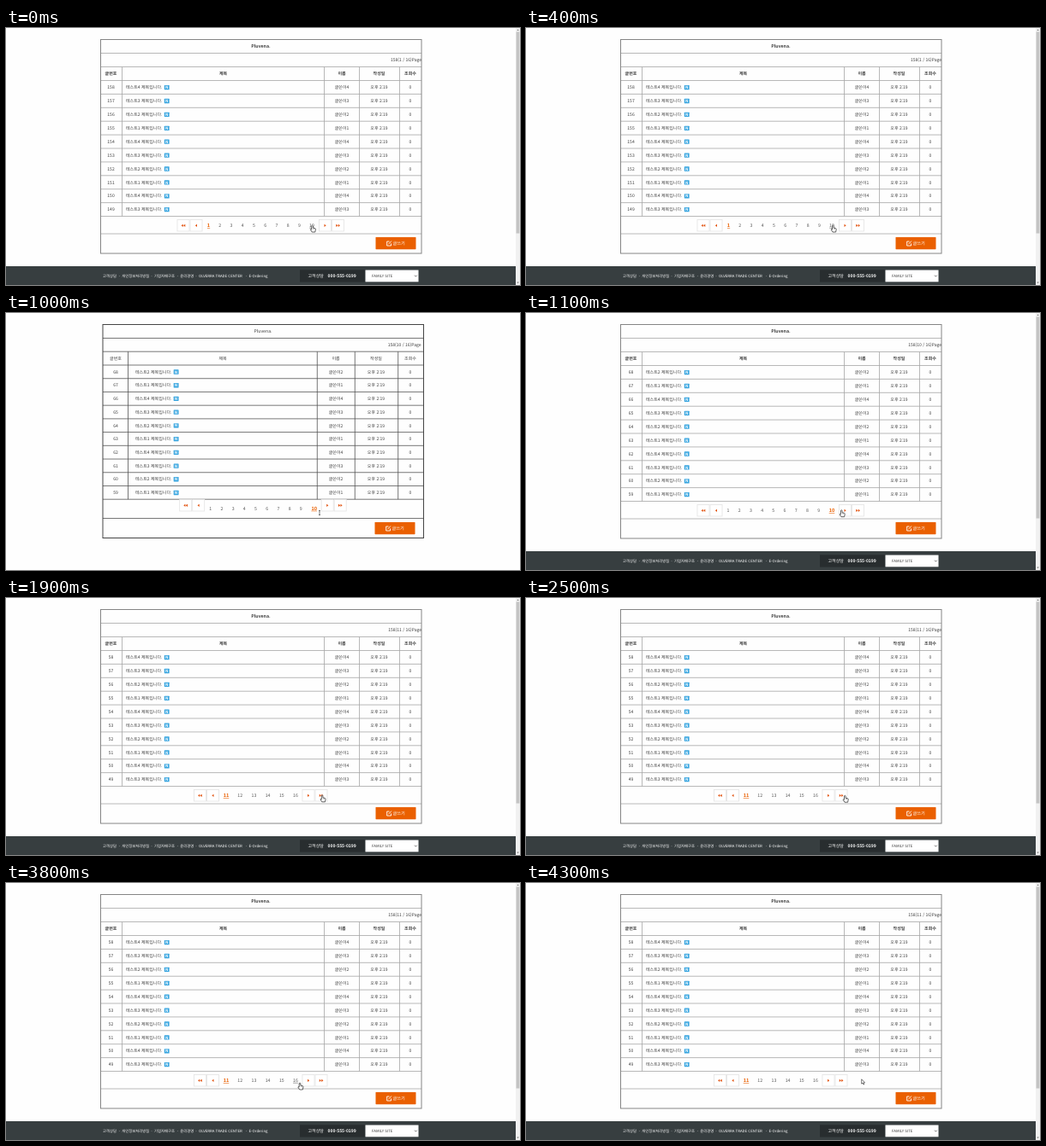
Write an HTML page that moves like this. It is 600 by 301 pixels and loops after 4500 ms.

```html
<!DOCTYPE html>
<html lang="ko">
<head>
<meta charset="utf-8">
<title>Board paging</title>
<style>
  html, body { margin: 0; width: 100%; height: 100%; overflow: hidden; background: #fefefe; }
  svg { display: block; width: 600px; height: 301px; }
  text { font-family: "Noto Sans CJK KR", "Noto Sans CJK", "Noto Sans", sans-serif; text-rendering: geometricPrecision; white-space: pre; }
</style>
</head>
<body>
<svg viewBox="0 0 600 301"><g id="page"></g><g id="cursor"></g></svg>
<script>
const LOOP = 4500, STEP = 100;
const ORANGE = '#ea6000', INK = '#3c3c3c';
const pageLayer = document.getElementById('page');
const cursorLayer = document.getElementById('cursor');

const styledLayout = {
  left: 110.5, right: 485, headTop: 45.5, bodyTop: 61.5, pitch: 15.9, listEnd: 220.5, pagerEnd: 241, bottom: 264,
  columns: [135.5, 371.5, 412.5, 459.5], centers: [122.5, 253.5, 392, 435.5, 472], titleX: 140, iconX: 184.8,
  line: '#a6a6a6', frame: '#858585', boxTop: 224, numberY: 231, button: 431.5, summaryX: 485, heading: 297.5
};
const bareLayout = {
  left: 113, right: 487.5, headTop: 45.2, bodyTop: 61, pitch: 15.72, listEnd: 218.2, pagerEnd: 240.5, bottom: 263.5,
  columns: [142.5, 363.3, 407.3, 457.7], centers: [128, 253, 385, 432, 472], titleX: 151, iconX: 195.7,
  line: '#555', frame: '#444', boxTop: 218, numberY: 228.7, button: 430.5, summaryX: 484.5, heading: 300
};

// first number, pitch, current page's x, and left edges of the arrow boxes
const pagers = {
  1:  { from: 1, to: 10, x: 236.5, gap: 13.25, lastX: 357, boxes: [200, 215, 365.5, 380.5] },
  10: { from: 1, to: 10, x: 236, gap: 13.2, lastX: 357, boxes: [200, 215, 365.5, 380.5] },
  11: { from: 11, to: 16, x: 257, gap: 16.2, lastX: 338, boxes: [219.5, 234.5, 346, 361] }
};

function text(x, y, value, { size = 5, weight = 400, fill = INK, anchor = 'middle', extra = '' } = {}) {
  return `<text x="${x}" y="${y + size * .36}" font-size="${size}" font-weight="${weight}" fill="${fill}" text-anchor="${anchor}" ${extra}>${value}</text>`;
}
const rect = (x, y, w, h, fill, extra = '') =>
  `<rect x="${x}" y="${y}" width="${w}" height="${h}" fill="${fill}" ${extra}/>`;
const path = (d, stroke, width = 1, fill = 'none') =>
  `<path d="${d}" stroke="${stroke}" stroke-width="${width}" fill="${fill}"/>`;

function table(page, flash, L) {
  const first = 168 - page * 10;
  const rules = [29.5, L.headTop, L.pagerEnd];
  for (let i = 0; i <= 10; i++) rules.push(L.bodyTop + i * L.pitch);
  let out = path(rules.map(y => `M${L.left} ${y}H${L.right}`).join('') +
    L.columns.map(x => `M${x} ${L.headTop}V${L.listEnd}`).join(''), L.line, .8);
  out += rect(L.left, 13.5, L.right - L.left, L.bottom - 13.5, 'none', `stroke="${L.frame}"`);
  out += text(L.heading, 21.5, 'Pluvena.', { size: 5.2, weight: flash ? 500 : 700 });
  out += text(L.summaryX, 37.5, `158(${page} / 16)Page`, { anchor: 'end' });
  ['글번호', '제목', '이름', '작성일', '조회수'].forEach((label, i) =>
    out += text(L.centers[i], 53.2, label, { weight: flash ? 500 : 700 }));

  for (let i = 0; i < 10; i++) {
    const y = L.bodyTop + (i + .5) * L.pitch, id = first - i, kind = (id + 1) % 4 + 1;
    out += text(L.centers[0], y, id);
    out += text(L.titleX, y, `테스트${kind} 제목입니다.`, { anchor: 'start' });
    out += rect(L.iconX, y - 2.5, 5.8, 5.3, '#35a4df', 'rx=".5"');
    out += text(L.iconX + 2.9, y + .1, 'N', { size: 4.6, weight: 700, fill: '#fff' });
    [`글쓴이${kind}`, '오후 2:19', '0'].forEach((cell, c) => out += text(L.centers[c + 2], y, cell));
  }
  return out;
}

function arrows(x, y, dir, count) {
  let d = '';
  for (let i = 0; i < count; i++) {
    const cx = x + (i - (count - 1) / 2) * 2.5;
    d += `M${cx + dir * 1.2} ${y}l${-dir * 2.2} -1.6v3.2z`;
  }
  return `<path d="${d}" fill="#e2500c"/>`;
}

function pager(page, flash, hover, L) {
  const P = pagers[page], shift = flash ? 2.7 : 0;
  let out = '';
  P.boxes.forEach((x, i) => {
    out += rect(x + shift, L.boxTop + .5, 14, 13.5, '#fff', 'stroke="#e3e3e3" stroke-width=".8"');
    out += arrows(x + shift + 7, L.boxTop + 7.3, i < 2 ? -1 : 1, i % 3 ? 1 : 2);
  });
  for (let n = P.from; n <= P.to; n++) {
    const x = (n === P.to ? P.lastX : P.x + (n - P.from) * P.gap) + shift;
    const on = n === page;
    out += text(x, L.numberY, n, {
      size: on ? 5.6 : 5.2, weight: on ? 700 : 400, fill: on ? ORANGE : '#555',
      extra: on || n === hover ? 'text-decoration="underline"' : ''
    });
  }
  return out;
}

function writeButton(x) {
  return rect(x, 245, 47, 14.2, ORANGE, 'rx=".6"') +
    path(`M${x + 16} 250H${x + 13.2}V255H${x + 18}V252.4M${x + 15} 253.2L${x + 18.4} 249.5`, '#fff', .9) +
    text(x + 20, 251.9, '글쓰기', { size: 5.2, fill: '#fff', anchor: 'start' });
}

function chrome() {
  const links = [[113, '고객상담'], [135.3, '개인정보처리방침'], [173, '기업자배구조'], [203.3, '윤리경영'],
    [225, 'OLVERRA TRADE CENTER'], [283.5, 'E-Ordering']];
  let out = rect(0, 279, 595, 22, '#373e40');
  links.forEach(([x, label], i) => {
    out += text(x, 290.5, label, { size: 4.35, weight: 500, fill: '#fff', anchor: 'start' });
    if (i) out += `<circle cx="${x - 3}" cy="290.5" r=".4" fill="#aaa"/>`;
  });
  out += rect(343, 283.3, 76.5, 14.2, '#282d2f');
  out += text(352.5, 290.5, '고객상담', { fill: '#fff', anchor: 'start' });
  out += text(375.5, 290.5, '000-555-0199', { weight: 700, fill: '#fff', anchor: 'start' });
  out += rect(419.5, 283.5, 62, 13.8, '#fff');
  out += text(427, 290.5, 'FAMILY SITE', { size: 4.4, anchor: 'start' });
  out += path('M477 289.7l1.4 1.4l1.4 -1.4', '#333', .7);
  out += rect(595, 0, 5, 301, '#f1f1f1') + rect(595.6, 4.5, 3.8, 236, '#c4c4c4');
  out += `<path d="M596.4 3l1.2-1.6l1.2 1.6zM596.4 297.6l1.2 1.6l1.2-1.6z" fill="#777"/>`;
  return out;
}

function drawPage(page, flash, hover) {
  const L = flash ? bareLayout : styledLayout;
  return rect(0, 0, 600, 301, '#fefefe') + table(page, flash, L) +
    pager(page, flash, hover, L) + writeButton(L.button) + (flash ? '' : chrome());
}

const cursors = {
  hand: path('M-.8 .6Q0-.5 .8 .6V3L3.3 3.6Q4 4 3.9 5L3.3 8H-.3L-2.1 5.1Q-2.2 4.2-.8 5Z', '#222', .7, '#fff') +
    path('M1.2 3.2V4.7M2.4 3.5V4.8', '#444', .4),
  arrow: path('M0 0V5.4L1.3 4.3L2.2 6.3L3.1 5.9L2.2 4H3.8Z', '#222', .6, '#fff'),
  beam: path('M-1 -2.5H1M0 -2.5V2.5M-1 2.5H1', '#444', .7)
};

// time, x, y of the pointer's tip
const track = [[0, 357.5, 231], [200, 358.3, 231], [400, 358.3, 231], [700, 359, 231], [900, 359, 231],
  [1000, 366, 234], [1100, 368.3, 230.7], [1800, 368.3, 230.7], [2300, 372.3, 231.2], [2500, 372.3, 231.2],
  [2900, 363, 231.2], [3200, 341.5, 232.7], [3600, 341.5, 232.7], [3800, 343, 234], [4000, 343, 234],
  [4300, 391.7, 229.8], [LOOP, 391.7, 229.8]];

function pointerAt(t) {
  const i = track.findIndex(key => key[0] > t);
  const [t0, x0, y0] = track[i - 1], [t1, x1, y1] = track[i];
  const k = (t - t0) / (t1 - t0);
  return [x0 + (x1 - x0) * k, y0 + (y1 - y0) * k];
}

let shown = '';
function render(now) {
  const t = Math.floor(now % LOOP / STEP) * STEP;
  const page = t < 1000 ? 1 : t < 1800 ? 10 : 11;
  const flash = t === 1000;
  const [x, y] = pointerAt(t);
  const hover = t < 1000 ? 10 : t > 3000 && x < 345 ? 16 : 0;
  const key = [page, flash, hover].join();
  if (key !== shown) {
    pageLayer.innerHTML = drawPage(page, flash, hover);
    shown = key;
  }
  const shape = flash ? 'beam' : t >= 4200 ? 'arrow' : 'hand';
  cursorLayer.innerHTML = cursors[shape];
  cursorLayer.setAttribute('transform', `translate(${x} ${y})`);
}

const start = performance.now();
function tick() {
  render(performance.now() - start);
  requestAnimationFrame(tick);
}
tick();
</script>
</body>
</html>
```
